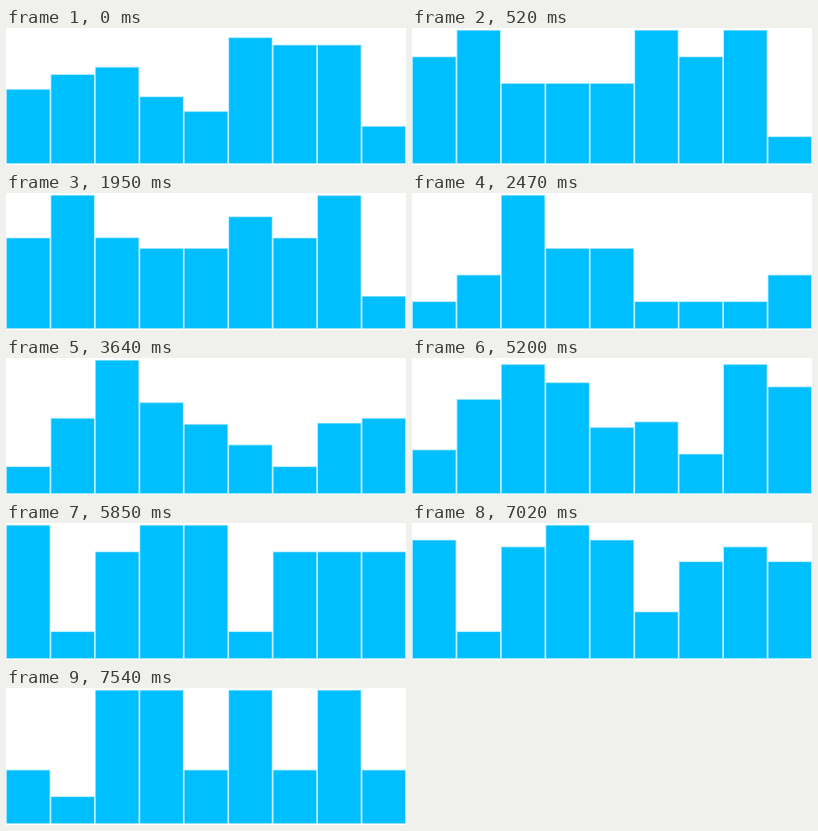
These frames come from a looping animation (500x172 px, 8000 ms). A matplotlib script:

```python
import numpy as np
import matplotlib.pyplot as plt
from matplotlib.animation import FuncAnimation

WIDTH, HEIGHT, DPI = 500, 172, 100
LOOP, INTERVAL = 8000, 20      # ms
TICK = 130                     # ms between visible updates
DURATION = 500                 # ms per transition
BASE, FULL, LEVELS = 170, 167, 5
BARS = 9
PITCH = WIDTH / BARS
MARGIN = 0.8                   # from the column's side to the bar
INSET = 0.3                    # solid core inside the soft edge
BLUE = (0, 0.75, 1)

# The opening chart counts up to 18, the later ones show levels.
OPENING = np.array([10, 12, 13, 9, 7, 17] + [16] * 2 + [5]) / 18 * LEVELS
CHANGES = [   # start in ms, new levels
    (20, [4, 6] + [3] * 3 + [5, 4, 6, 1]),
    (1871, [1, 2, 5] + [3] * 2 + [1] * 3 + [2]),
    (3515, [1, 4, 5, 4, 2, 3, 1, 5, 4]),
    (5132, [5, 1, 4, 5] + [5, 1] + [4] * 3),
    (6945, [2, 1, 5] + [5, 2] * 3),
]


def bezier(a, b, s):
    """One coordinate of a cubic curve from 0 to 1 with handles a and b."""
    return 3 * a * s * (1 - s) ** 2 + 3 * b * s ** 2 * (1 - s) + s ** 3


def ease(x):
    s = np.linspace(0, 1, 201)
    return np.interp(x, bezier(0.25, 0.25, s), bezier(0.1, 1, s))


def heights(t):
    """Bar heights in pixels, cut off at the full height."""
    levels = OPENING
    for start, goal in CHANGES:
        levels = levels + (goal - levels) * ease((t - start) / DURATION)
    return np.minimum(levels / LEVELS, 1) * FULL


fig = plt.figure(figsize=(WIDTH / DPI, HEIGHT / DPI), dpi=DPI, facecolor="white")
ax = fig.add_axes([0, 0, 1, 1])
bars = ax.bar(np.arange(BARS) * PITCH + MARGIN + INSET, np.zeros(BARS),
              width=PITCH - 2 * (MARGIN + INSET), bottom=BASE, align="edge",
              color=BLUE, edgecolor=(*BLUE, 0.3), linewidth=2 * 72 / DPI,
              snap=False)
ax.set_xlim(0, WIDTH)
ax.set_ylim(HEIGHT, 0)
ax.axis("off")


def update(frame):
    t = (frame + 0.5) * INTERVAL // TICK * TICK
    for bar, h in zip(bars, heights(t)):
        bar.set_y(BASE - h + INSET)
        bar.set_height(h - 2 * INSET)
    return list(bars)


anim = FuncAnimation(fig, update, frames=LOOP // INTERVAL, interval=INTERVAL,
                     repeat=True, repeat_delay=0)
plt.show()
```
